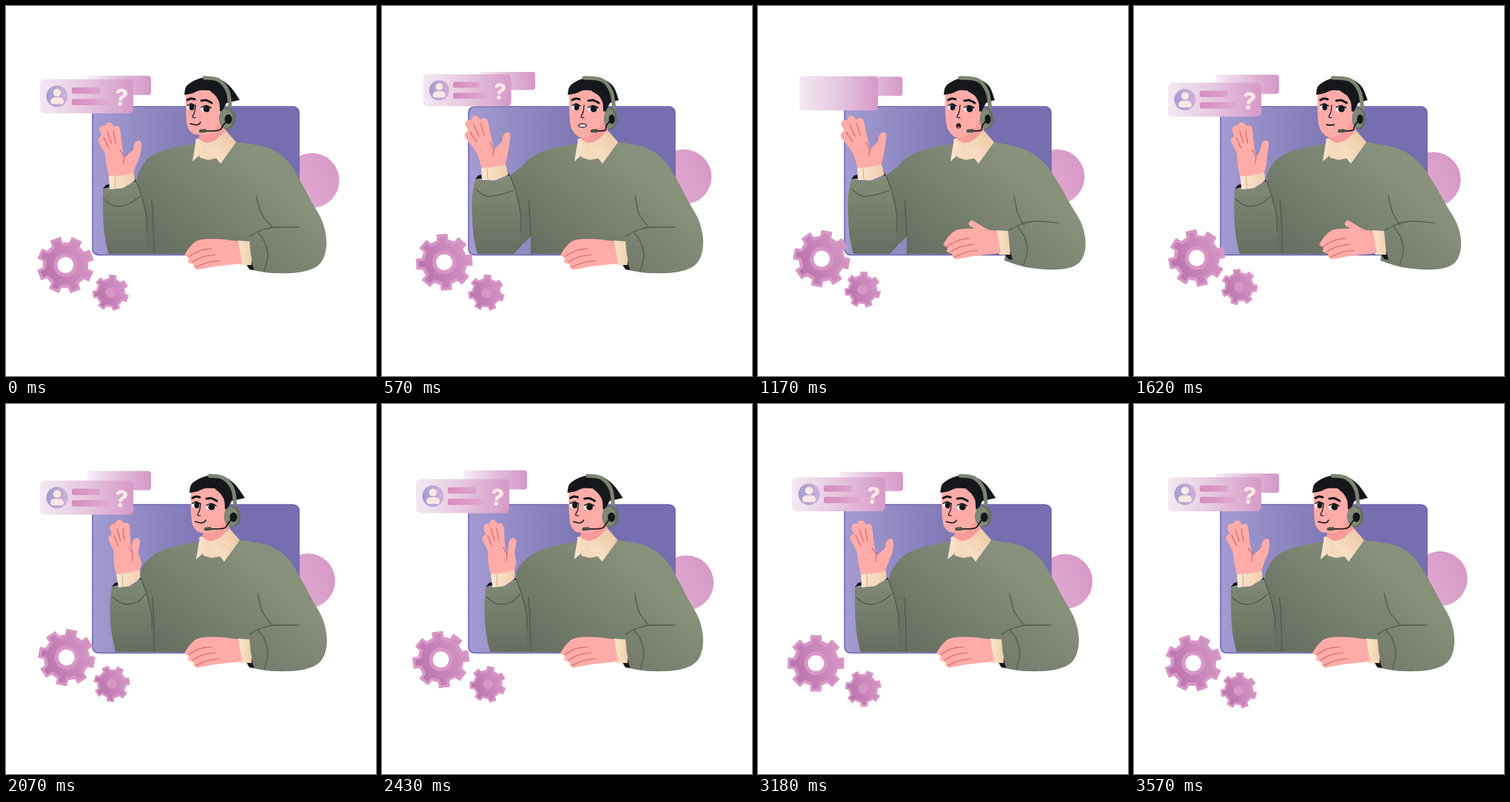
An HTML page with a canvas for the animation above (3600 ms loop, 500 by 500 pixels).

```html
<!DOCTYPE html>
<html lang="en">
<head>
<meta charset="utf-8">
<title>Support agent</title>
<style>
html, body { margin: 0; width: 100%; height: 100%; overflow: hidden; background: #fff; }
canvas { display: block; width: 500px; height: 500px; }
</style>
</head>
<body>
<canvas id="stage" width="500" height="500"></canvas>
<script>
const ctx = document.getElementById('stage').getContext('2d');
const LOOP = 3600, TAU = 2 * Math.PI;
const SKIN = '#ffaca9', SKIN_LINE = '#dc6467', INK = '#15171b';
const CREAM = '#f5dabd', GREEN = '#7c8671', SEAM = '#525b4b';

const clamp = x => Math.max(0, Math.min(1, x));
const mix = (a, b, k) => a + (b - a) * k;
const ease = x => { const u = clamp(x); return u * u * (3 - 2 * u); };

// Rises from 0 to 1 over a..b, falls back over c..d.
const pulse = (t, a, b, c, d) => ease((t - a) / (b - a)) - ease((t - c) / (d - c));
// Swings around mid once a loop, highest at time peak.
const swing = (t, mid, size, peak) => mid + size * Math.cos(TAU * (t - peak) / LOOP);

function poseAt(t) {
  const lean = pulse(t, 0, 500, 2850, 3540), dip = pulse(t, 1200, 1600, 1700, 2600);
  return {
    headX: -10 * (1 - lean) - 5 * dip,
    bodyX: -8 * (1 - lean) - 5 * dip,
    turn: 1 - pulse(t, 0, 500, 1500, 2050),
    raise: pulse(t, 650, 1100, 1650, 2030),
    out: pulse(t, 0, 500, 1200, 1600),
    inward: pulse(t, 1250, 2050, 2100, 3200)
  };
}

// Smooth curve through a flat list x, y, x, y...
function trace(p, first) {
  const n = p.length / 2;
  const pt = i => { const k = Math.max(0, Math.min(n - 1, i)) * 2; return [p[k], p[k + 1]]; };
  if (first) ctx.moveTo(p[0], p[1]); else ctx.lineTo(p[0], p[1]);
  for (let i = 0; i < n - 1; i++) {
    const [a, b, c, d] = [pt(i - 1), pt(i), pt(i + 1), pt(i + 2)];
    ctx.bezierCurveTo(b[0] + (c[0] - a[0]) / 6, b[1] + (c[1] - a[1]) / 6,
      c[0] - (d[0] - b[0]) / 6, c[1] - (d[1] - b[1]) / 6, c[0], c[1]);
  }
}

function shape(fill, ...runs) {
  ctx.beginPath();
  runs.forEach((r, i) => trace(r, i === 0));
  ctx.closePath();
  ctx.fillStyle = fill;
  ctx.fill();
}

function polygon(fill, ...corners) {
  shape(fill, ...corners);
}

function line(p, color, width = 1.3) {
  ctx.beginPath();
  trace(p, true);
  ctx.strokeStyle = color;
  ctx.lineWidth = width;
  ctx.lineCap = ctx.lineJoin = 'round';
  ctx.stroke();
}

function oval(fill, x, y, rx, ry = rx) {
  ctx.beginPath();
  ctx.ellipse(x, y, rx, ry, 0, 0, TAU);
  ctx.fillStyle = fill;
  ctx.fill();
}

function box(fill, x, y, w, h, r) {
  ctx.beginPath();
  ctx.roundRect(x, y, w, h, r);
  ctx.fillStyle = fill;
  ctx.fill();
}

function gradient(x0, y0, x1, y1, ...colors) {
  const g = ctx.createLinearGradient(x0, y0, x1, y1);
  colors.forEach((c, i) => g.addColorStop(i / (colors.length - 1), c));
  return g;
}

function within(x, y, draw) {
  ctx.save();
  ctx.translate(x, y);
  draw();
  ctx.restore();
}

const sweater = gradient(330, 200, 200, 350, '#88917c', '#636b5d');
const sleeveFill = gradient(0, 225, 0, 336, '#848d78', '#666e60');

function drawScreen(t) {
  const x = swing(t, 409.5, 5.5, 3150), y = swing(t, 236, 6, 2680);
  oval(gradient(x - 37, y + 20, x + 37, y - 20, '#e0afd3', '#d797c5'), x, y, 37);
  box(gradient(117, 0, 396, 0, '#a39bd1', '#8c84bf', '#766eae', '#766eae'), 117, 136, 279, 200.5, 8);
  ctx.strokeStyle = '#7067ad';
  ctx.lineWidth = 1.6;
  ctx.stroke();
}

function drawCardContent() {
  const bar = gradient(-20, 0, 31, 0, '#d78bbd', '#deadd1');
  oval(gradient(-54, 0, -26, 0, '#a69ccf', '#d0b2d9'), -40, 0, 14.5);
  oval('#f8e8e6', -40, -5, 5.2);
  box('#f8e8e6', -49, 1.5, 18, 9, [8, 8, 5, 5]);
  box(bar, -20, -12, 38, 8.5, 2.5);
  box(bar, -20, 3.5, 51, 8.5, 2.5);
  within(46.5, 3.5, () => {
    ctx.rotate(0.1);
    ctx.font = '800 31px Inter, sans-serif';
    ctx.textAlign = 'center';
    ctx.textBaseline = 'middle';
    ctx.fillStyle = '#fdebe5';
    ctx.fillText('?', 0, 0);
  });
}

function drawCards(t) {
  const leaving = t < 1000;
  const out = 1 - clamp((t - 400) / 450) ** 3;
  const sx = leaving ? out : 1 - (1 - clamp((t - 1020) / 250)) ** 2;
  if (sx < 0.02) return;
  const sy = leaving ? out : 1;
  const drift = leaving ? Math.min(1.3, (1 - out) / 0.054) : 0;
  const frontY = 122 + 4.5 * pulse(t, 1200, 1550, 2150, 2750) - (leaving ? 8 * drift : 25 * (1 - sx));

  within(153 + 15 * drift, swing(t, 106, 3.5, 700) - 8 * drift, () => {
    ctx.scale(leaving ? 1 - 1.8 * Math.min(0.5, 1 - sx) : mix(0.9, 1, sx), sy);
    box(gradient(-43, 0, 43, 0, '#f6eef6', '#e3bedb', '#d596c6'), -43, -13, 86, 26, 4);
  });
  within(109 + 6 * drift, frontY, () => {
    ctx.scale(sx, sy);
    box(gradient(-63, 0, 63, 0, '#f2eaf2', '#e6c6df', '#d699c8'), -63, -23, 126, 46, 6);
    ctx.globalAlpha = leaving ? 1 : clamp((t - 1230) / 220);
    drawCardContent();
  });
}

function gearPath(teeth, outer, root, tip, base) {
  ctx.beginPath();
  for (let i = 0; i < teeth; i++) {
    const a = i * TAU / teeth;
    [[root, -base], [outer, -tip], [outer, tip], [root, base]].forEach(([r, d]) =>
      ctx.lineTo(r * Math.cos(a + d), r * Math.sin(a + d)));
  }
  ctx.closePath();
}

function drawGear(x, y, teeth, r, angle, hole) {
  within(x, y, () => {
    const shade = gradient(-r, r * 0.4, r, -r * 0.4, '#b56fa9', '#c884b9', '#d597c6');
    ctx.rotate(angle);
    gearPath(teeth, r, r * 0.8, 0.18, 0.23);
    ctx.fillStyle = ctx.strokeStyle = '#d797c6';
    ctx.lineWidth = 1.5;
    ctx.lineJoin = 'round';
    ctx.fill();
    ctx.stroke();
    gearPath(teeth, r * 0.91, r * 0.71, 0.11, 0.17);
    ctx.rotate(-angle);
    ctx.fillStyle = shade;
    ctx.fill();
    oval('#d797c6', 0, 0, hole ? 16 : 6.8);
    if (hole) oval('#fff', 0, 0, 10.8);
  });
}

function drawGears(t) {
  const turn = TAU * t / LOOP;
  drawGear(swing(t, 82, 4, 1150), swing(t, 345.5, 5, 3350), 8, 38, 0.42 - turn / 2, true);
  drawGear(swing(t, 142, 1, 2400), swing(t, 383, 5, 300), 7, 24, -1.45 + turn * 6 / 7, false);
}

// Corners of the waving sleeve's hem and of the shirt cuff above it.
function waveArm({ out, inward }) {
  return {
    lx: 131 - 5 * out + 12 * inward, ly: 247 - 13 * out,
    rx: 176 - 3 * out + 7 * inward, ry: 237 - 8 * out,
    ax: 139 - 5 * out + 10 * inward, ay: 230 - 11 * out,
    bx: 173 - 6 * out + 8 * inward, by: 226 - 12 * out - 2 * inward
  };
}

function drawTorso(pose) {
  const { lx, ly, rx, ry } = waveArm(pose);
  const b = pose.bodyX, side = 201 + b * 0.15, gap = 24 * pose.out;
  const bulge = 131 - 9.5 * pose.out + 9.5 * pose.inward;
  const shoulder = [262 + b, 186, 225 + b, 194, 201 + b, 205, 184 + b * 0.4, 222, rx, ry];
  const innerSeam = [rx, ry, rx + 8, ry + 23, rx + 14, ry + 50, rx + 14, 304];
  ctx.save();
  ctx.beginPath();
  ctx.rect(100, 80, 380, 255);
  ctx.clip();
  polygon(sweater, shoulder, [side, 262], [side, 336], [350, 336], [372, 300], [372, 212],
    [340, 192], [318 + b, 184], [282 + b, 196]);
  polygon(INK, [lx, ly], [lx + 4, ly - 5], [rx - 4, ry - 7], [rx, ry]);
  polygon(sweater, [rx, ry], [rx + 8, ry + 23], [rx, 337], [side - 1 - gap, 337],
    [side - 10 * pose.out, 326 - 5 * pose.out], [side + 1, 335 - gap], [side + 1, 255], [201 + b, 208]);
  shape(sleeveFill, [lx, ly, bulge, ly + 28, bulge + 2, 308, bulge + 8, 337],
    [Math.min(rx + 14, side - gap), 337], [rx + 14, 326 - 5 * pose.out],
    [...innerSeam.slice(6), ...innerSeam.slice(4, 6), ...innerSeam.slice(2, 4), rx, ry],
    [mix(lx, rx, 0.55), mix(ly, ry, 0.55) + 5, lx, ly]);
  line(innerSeam, SEAM);
  line([lx + 1, ly + 14, lx + 15, ly + 23, lx + 34, ly + 21, rx + 5, ry + 20], SEAM);
  line([side - 3, 262, side - 1, 290, side, 335 - gap], SEAM);
  ctx.restore();
}

function drawWavingHand(pose) {
  const { lx, ly, rx, ry, ax, ay, bx, by } = waveArm(pose);
  const { out, inward } = pose;
  const cx = (ax + bx) / 2, cy = (ay + by) / 2;
  const tilt = -18 - 7.5 * out + 4 * inward, spread = 7.4 + 1.5 * out;
  // A point along finger i (0 to 3), k being 1 at its tip.
  const finger = (i, k) => {
    const a = (tilt + (i - 1.5) * spread) * Math.PI / 180;
    const length = 66 - 4 * (i - 1.7) ** 2 + 3 * Math.min(i, 1) - 4 * inward * (1 - i / 3);
    return [cx + k * length * Math.sin(a), cy - k * length * Math.cos(a)];
  };
  const tx = cx + 22 - 4 * out - 11 * inward, ty = cy - 41;

  for (let i = 0; i < 4; i++) line([...finger(i, 0.4), ...finger(i, 0.98)], SKIN, 11);
  const [px, py] = finger(0, 0.62), [qx, qy] = finger(3, 0.6);
  shape(SKIN, [ax + 1, ay + 4, ax - 3, ay - 13, px - 6, py], [qx + 5, qy, qx + 9, qy + 14],
    [tx - 6, ty + 7, tx - 4, ty - 2, tx + 2, ty - 5, tx + 5, ty, tx + 3, ty + 15, bx + 2, by - 9, bx - 2, by + 4]);
  for (let i = 0; i < 3; i++) line([...finger(i + 0.5, 0.9), ...finger(i + 0.5, 0.65)], SKIN_LINE, 1.2);
  line([qx + 3, qy + 4, qx + 8, qy + 13, qx + 7, qy + 22], SKIN_LINE, 1.2);

  shape(gradient(ax, 0, bx, 0, '#fae6cf', '#f1d0ae'), [ax, ay, cx, cy + 1, bx, by],
    [rx - 2, ry - 1], [cx + 2, (ly + ry) / 2 + 4, lx + 9, ly + 1]);
  line([ax + 8, ay + 1, ax + 9, ly - 1], '#c69f7e', 0.9);
}

function drawRestingHand(raise) {
  polygon(INK, [324, 348], [332, 345], [335, 357], [329, 356]);
  polygon(gradient(312, 0, 332, 0, '#fae6cf', '#f1d0ae'), [313, 317], [329, 318], [332, 350], [317, 350]);
  if (raise > 0.05) line([300, 320, 300 - 20 * raise, 320 - 12 * raise], SKIN, 8);
  shape(SKIN, [314, 318, 288, 315, 262, 316, 249, 325, 241, 337], [247, 340, 246, 346],
    [253, 349, 258, 356, 282, 352, 319, 348]);
  for (let i = 0; i < 3; i++) {
    const x = 247 + i * 5, y = 339 + i * 7;
    line([x, y, x + 14, y - 8 + i, x + 31, y - 11 + i], SKIN_LINE, 1.2);
  }
}

function drawRestingArm({ bodyX, raise }) {
  const outline = [320 + bodyX * 0.7, 184, 355, 191, 380, 207, 397, 232, 413, 262, 429, 292,
    434, 322, 426, 347, 402, 359, 362, 361, 333, 357];
  const last = outline.length / 2 - 1;
  const arm = outline.map((v, i) => {
    const u = Math.floor(i / 2) / last, arch = Math.sin(Math.PI * u);
    return i % 2 === 0 ? v + bodyX * 0.3 * (1 - u) + 9 * raise * arch
      : v + raise * (6 * arch - 13 * u ** 3);
  });
  const sx = 10 * raise, sy = -8 * raise, crease = bodyX / 2;

  shape(sweater, arm, [329 + sx, 312 + sy, 345 + sx, 304 + sy, 362 + sx, 299 + sy], [352, 240]);
  within(9 * raise, -14 * raise, () => drawRestingHand(raise));
  within(sx, sy, () => {
    line([329, 311, 345, 303, 362, 299, 396, 299 + 2 * raise], SEAM);
    line([341, 306, 350, 320, 354, 338, 349, 358], SEAM);
  });
  line([342 + crease + 4 * raise, 256, 347 + crease / 2 + 4 * raise, 280, 360, 299 + sy / 4], SEAM);
}

function drawCollar(bodyX) {
  within(bodyX, 0, () => {
    polygon(CREAM, [264, 180], [270, 205], [281, 208], [297, 205], [315, 180], [300, 168]);
    shape('#f79c9b', [274, 160], [268, 179, 279, 185, 293, 180, 305, 168], [302, 155]);
    polygon(gradient(262, 0, 282, 0, '#fae4cb', '#f1d2b0'), [265, 180], [260, 210], [281, 192]);
    polygon(gradient(285, 210, 315, 175, '#fae4cb', '#eecaa5'), [305, 168], [319, 184], [298, 213], [281, 192]);
  });
}

function mouthAt(t) {
  if (t >= 300 && t < 1800) return ['line', 'open', 'o', 'teeth', 'open'][Math.floor(t / 150) % 5];
  return t > 2550 && t < 3150 ? 'grin' : 'smile';
}

function drawMouth(kind, x) {
  if (kind === 'o') {
    oval(INK, x, 162, 3.3, 3.6);
    oval('#d6535c', x, 164, 1.8, 1.2);
  } else if (kind === 'line') {
    line([x - 5, 160.5, x, 161, x + 5, 160.5], INK, 1.9);
  } else if (kind === 'open') {
    oval(INK, x, 161.5, 4.5, 2.6);
  } else if (kind === 'teeth') {
    oval(INK, x, 161.5, 6, 3);
    oval('#fff', x, 161.5, 4.5, 1.8);
  } else {
    line([x - 7, 159, x - 1, 160.5, x + 4, 160, x + 7, 157], INK, kind === 'grin' ? 3 : 1.6);
    if (kind === 'grin') line([x - 5, 159.5, x, 160.5, x + 5, 158.5], '#fff', 1.2);
  }
}

function drawEye(x, y, size) {
  oval('#fff', x - 1, y, size + 1, 4.4);
  oval(INK, x + 0.5, y + 0.3, size - 1, 4.3);
  line([x - size - 1, y - 2, x, y - 4.5, x + size + 1, y - 1.5], INK, 1.6);
}

function drawHead(t, { headX, turn }) {
  within(headX, 0, () => {
    const nose = 271 - 7 * turn, far = -2 * turn, near = -5 * turn;
    shape(SKIN, [253, 116, 253, 140, 255, 162, 262, 174 + far, 272, 178 - 4 * turn, 285, 173, 299, 158],
      [304, 130, 280, 105]);
    drawEye(262.5 + far, 136.5, 4.5);
    drawEye(285.5 + near, 139, 5.5);
    line([257 + far, 127, 262 + far, 125, 267 + far, 126], INK, 3);
    line([279 + near, 128, 286 + near, 127.5, 293 + near, 131], INK, 3);
    line([nose + 2, 134, nose + 1, 143, nose - 2, 150, nose + 2, 151], INK, 1.2);
    drawMouth(mouthAt(t), 271 + near);

    shape(INK, [251, 120, 255, 107, 275, 97, 296, 98, 312, 108, 320 + 6 * turn, 127],
      [308, 131, 302, 143], [299, 142, 298, 130, 293, 121],
      [282 + 3 * turn, 114, 272, 114, 262, 118, 251, 120]);
    line([273 + 5 * turn, 97, 297, 100, 310, 116, 314 - turn, 142], GREEN, 5);
    oval('#65705e', 309, 152, 9 + 2 * turn, 14.5);
    oval('#7f8974', 307.5, 152, 7 + 2 * turn, 13);
    oval(INK, 310.5, 153, 4 + turn, 6.5);
    const mic = 287 - 11 * turn;
    line([mic, 169, mix(mic, 309, 0.65), 168, 303, 162, 309, 154], INK, 1.8);
    line([mic - 3, 169, mic + 3, 168.6], '#4b5348', 4.6);
  });
}

function draw(t) {
  const pose = poseAt(t);
  ctx.fillStyle = '#fff';
  ctx.fillRect(0, 0, 500, 500);
  drawScreen(t);
  drawCards(t);
  drawTorso(pose);
  drawCollar(pose.bodyX);
  drawHead(t, pose);
  drawWavingHand(pose);
  drawRestingArm(pose);
  drawGears(t);
}

function frame() {
  draw(performance.now() % LOOP);
  requestAnimationFrame(frame);
}
frame();
</script>
</body>
</html>
```
